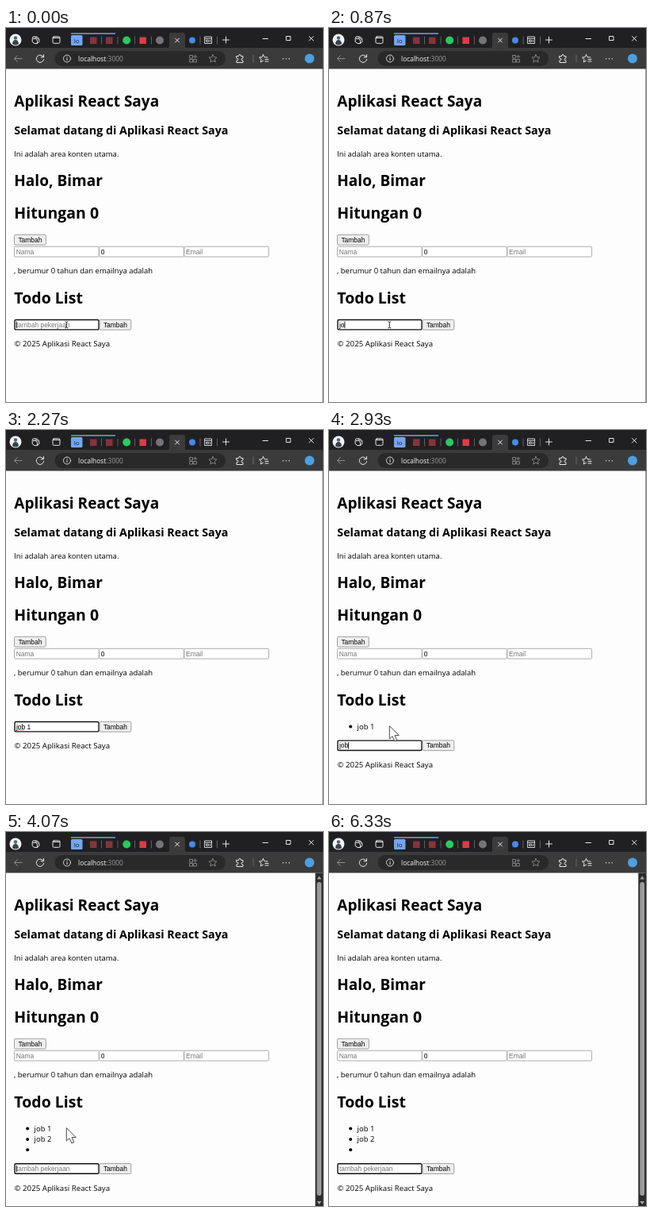
An HTML page that plays this animation: 400 px wide and 471 px high, repeating every 6400 ms.

```html
<!DOCTYPE html>
<html lang="id">
<head>
<meta charset="utf-8">
<title>Aplikasi React Saya</title>
<style>
  html, body { margin: 0; width: 100%; height: 100%; overflow: hidden; background: #fefdfe; }
  svg { display: block; width: 400px; height: 471px; }
  text { font: 9.5px "Open Sans", "Noto Sans", sans-serif; white-space: pre; }
  .h1 { font-size: 19.05px; font-weight: 700; }
  .short { font-size: 19.5px; }
  .h2 { font-size: 14.3px; font-weight: 700; }
  .ui { font: 8.45px "Liberation Sans", Arial, sans-serif; }
  .hint { fill: #757575; }
  .line { fill: none; stroke: #e8e8e8; stroke-linecap: round; stroke-linejoin: round; }
  .dim { stroke: #8c8c8c; }
  .box { fill: #fff; stroke: #999; stroke-width: .8; }
  .btn { fill: #efefef; stroke: #8a8a8a; stroke-width: .8; }
</style>
</head>
<body>
<svg viewBox="0 0 400 471">
  <rect width="400" height="471" fill="#fefdfe"/>
  <path d="M399.6 51V471" stroke="#777" stroke-width=".8"/>

  <!-- tab strip -->
  <rect width="400" height="27" fill="#202022"/>
  <rect y="25" width="400" height="26.5" fill="#3b3b3c"/>
  <path d="M203 25.5q3 0 3-3V9q0-3 3-3h14q3 0 3 3v13.5q0 3 3 3z" fill="#3b3b3c"/>
  <circle cx="12" cy="15" r="7.5" fill="#f0f3f5"/>
  <path d="M8 20q.5-5 4-5t4 5q-4 3-8 0z" fill="#39434c"/>
  <circle cx="12" cy="12.5" r="2.2" fill="#59636c"/>
  <path class="line" d="M34.500 11h4.500l2.800 2.500v4l-2.800 2h-3l-2.800-2v-4zM34.500 13.500h3.500l1.500 2.500v3.500M36.500 11.200l4 2.800"/>
  <path class="line" d="M60.500 10.800h6q1.500 0 1.500 1.500v5.500q0 1.500-1.500 1.500h-6q-1.500 0-1.500-1.500v-5.500q0-1.500 1.500-1.500zM59.500 12.500h8"/>
  <path d="M82 7h56" stroke="#6f9fe8" stroke-width="1.300"/>
  <rect x="82" y="9" width="14.500" height="13" rx="1.500" fill="#76a5ee"/>
  <text x="89.200" y="18.500" text-anchor="middle" style="font-size:8px" fill="#15253d">lo</text>
  <rect x="106" y="11.500" width="8.500" height="8.500" fill="#84343b"/>
  <rect x="126" y="11.500" width="8.500" height="8.500" fill="#84343b"/>
  <circle cx="152.200" cy="15.500" r="5" fill="#2bc95f"/>
  <rect x="168.500" y="11.500" width="8.500" height="8.500" fill="#dc3c49"/>
  <circle cx="194" cy="15.500" r="5" fill="#747476"/>
  <path class="line" d="M213.500 13l5 5m0-5l-5 5"/>
  <circle cx="235" cy="15.500" r="4" fill="#438be6"/>
  <path class="line" d="M251 11h8.500v8.500h-8.500zM251 13.300h8.500M253 15.300h2.500v2h-2.500zM257.500 15.500v2" stroke-width=".9"/>
  <path class="line dim" d="M120.500 11v9M141 11v9M162.500 11v9M183.500 11v9M245 11v9M266.500 11v9M312 34v9" stroke-width=".6"/>
  <path class="line" d="M273.500 15h8M277.500 11v8M324 13.500h6.500M354 10.500h5v5h-5zM382.500 10.500l5.500 5.500m0-5.500l-5.500 5.500"/>

  <!-- toolbar -->
  <path class="line dim" d="M20 38.500h-9.500m4-4l-4 4 4 4"/>
  <path class="line" d="M47.200 36.500a4.700 4.700 0 1 0 .5 3M47.500 33.500v3.300h-3.300"/>
  <rect x="61.500" y="29" width="215.500" height="19" rx="9.500" fill="#29292a"/>
  <circle class="line" cx="77" cy="38.500" r="4.500" stroke-width=".9"/>
  <path class="line" d="M77 38v2.500M77 36.200v.1"/>
  <text x="91" y="41.700" style="font-size:8.45px" fill="#f4f4f4">localhost<tspan fill="#9b9b9b">:3000</tspan></text>
  <path class="line dim" d="M232 34.500h3.500v3.500h-3.500zM232 39.500h3.500v3.500h-3.500zM237 39.500h3.500v3.500h-3.500zM238.800 34v4M236.800 36h4" stroke-width=".9"/>
  <path class="line dim" d="M261 33.500l1.500 3.200 3.500.4-2.600 2.400.8 3.500-3.200-1.800-3.200 1.800.8-3.500-2.600-2.400 3.500-.4z" stroke-width=".9"/>
  <path class="line" d="M291 35.500h2.500q0-2 1.500-2t1.500 2h2.500v2.500q-2 0-2 1.500t2 1.500v2.500h-8v-2.700q2 0 2-1.500t-2-1.500z"/>
  <path class="line" d="M324.500 33.500l1.500 3.200 4 .4M324.500 33.500l-1.500 3.200-3.500.4 2.600 2.400-.8 3.500 3.200-1.800M327 39.500h4M327 42h4"/>
  <path class="line" d="M349.700 38.700v.1M353.500 38.700v.1M357.300 38.700v.1" stroke-width="1.500"/>
  <circle cx="383" cy="38.500" r="6" fill="#4d9fe0"/>

  <!-- page -->
  <text class="h1" x="10.300" y="99">Aplikasi React Saya</text>
  <text class="h2" x="10.300" y="134">Selamat datang di Aplikasi React Saya</text>
  <text x="10.200" y="161.500">Ini adalah area konten utama.</text>
  <text class="h1" x="10.300" y="199.300">Halo, Bimar</text>
  <text class="h1 short" x="10.300" y="240">Hitungan 0</text>
  <rect class="btn" x="10.500" y="260.300" width="39.800" height="12.800" rx="1.500"/>
  <text class="ui" x="30.400" y="269.800" text-anchor="middle">Tambah</text>
  <rect class="box" x="10.500" y="275.300" width="106.700" height="12.800" rx="1.200"/>
  <rect class="box" x="117.700" y="275.300" width="106.700" height="12.800" rx="1.200"/>
  <rect class="box" x="224.900" y="275.300" width="106.700" height="12.800" rx="1.200"/>
  <text class="ui hint" x="12.700" y="284.700">Nama</text>
  <text class="ui" x="119.800" y="284.700">0</text>
  <text class="ui hint" x="227" y="284.700">Email</text>
  <text x="10" y="309.300">, berumur 0 tahun dan emailnya adalah</text>
  <text class="h1 short" x="10.300" y="347">Todo List</text>
  <g class="item"><circle cx="27.200" cy="373.500" r="2"/><text x="35.500" y="376.600">job 1</text></g>
  <g class="item"><circle cx="27.200" cy="387" r="2"/><text x="35.500" y="390.100">job 2</text></g>
  <g class="item"><circle cx="27.200" cy="400.300" r="2"/></g>

  <g id="form">
    <rect x="11" y="367.500" width="106" height="12.400" rx="1.500" fill="#fff" stroke="#111" stroke-width="1.400"/>
    <text id="hint" class="ui hint" x="13" y="376.700">tambah pekerjaan</text>
    <text id="entry" class="ui" x="13" y="376.700"></text>
    <path id="spell" d="M12.500 378.300l1.500-1 1.500 1 1.500-1 1.500 1 1.500-1 1.500 1 1.500-1" fill="none" stroke="#d8504f" stroke-width=".7"/>
    <path id="caret" d="M0 369.500v8.500" stroke="#000" stroke-width=".9"/>
    <rect class="btn" x="118" y="367.300" width="39.800" height="12.800" rx="1.500"/>
    <text class="ui" x="137.900" y="376.700" text-anchor="middle">Tambah</text>
    <text x="10.500" y="401.300" style="font-size:9.7px">© 2025 Aplikasi React Saya</text>
  </g>

  <g id="bar">
    <rect x="390.300" y="51.500" width="9.700" height="420" fill="#2c2c2d"/>
    <rect x="392.300" y="63" width="5.800" height="395" rx="2.900" fill="#9c9c9d"/>
    <path d="M392.300 59.500l2.900-4 2.900 4zM392.300 465l2.900 4 2.900-4z" fill="#a6a6a7"/>
  </g>
  <path id="beam" d="M74.300 369.800q1.700 0 2 .9.300-.9 2-.9M76.300 370.700v6.300M74.300 377.800q1.700 0 2-.9.300.9 2 .9" fill="none" stroke="#111" stroke-width=".9"/>
  <path id="arrow" d="M76.300 372.700v16.300l3.700-3.300 2.900 6.300 3-1.300-2.900-6.100h5.300z" fill="#fff" stroke="#333" stroke-width=".9" stroke-linejoin="round"/>
</svg>
<script>
const $ = id => document.getElementById(id);
const items = document.querySelectorAll('.item');
const LOOP = 6400, BLINK = 530, BEAM_OFF = 1250, ARROW_OFF = 5300;

// key presses: [time, text in the field, items in the list]
const keys = [
  [0, '', 0], [700, 'j', 0], [830, 'jo', 0], [1000, 'job', 0], [1250, 'job ', 0], [1700, 'job 1', 0],
  [2350, '', 1], [2730, 'j', 1], [2810, 'jo', 1], [2900, 'job', 1], [3080, 'job ', 1], [3270, 'job 2', 1],
  [3500, '', 2], [3870, '', 3], [ARROW_OFF, '', 3]
];
const offsets = [0, 23.6, 37, 50.3];

const show = (el, on) => el.setAttribute('visibility', on ? 'visible' : 'hidden');

function draw() {
  const t = performance.now() % LOOP;
  const [start, text, count] = keys.findLast(k => k[0] <= t);
  const entry = $('entry');
  entry.textContent = text;
  show($('hint'), !text);
  show($('spell'), text.length > 3);
  const caretX = 13.3 + (text ? entry.getComputedTextLength() : 0);
  $('caret').setAttribute('transform', `translate(${caretX})`);
  show($('caret'), Math.floor((t - start) / BLINK) % 2 === 0);
  $('form').setAttribute('transform', `translate(0 ${offsets[count]})`);
  items.forEach((el, i) => show(el, i < count));
  show($('bar'), count > 2);
  show($('beam'), t < BEAM_OFF);
  show($('arrow'), count > 0 && t < ARROW_OFF);
  requestAnimationFrame(draw);
}
draw();
</script>
</body>
</html>
```
